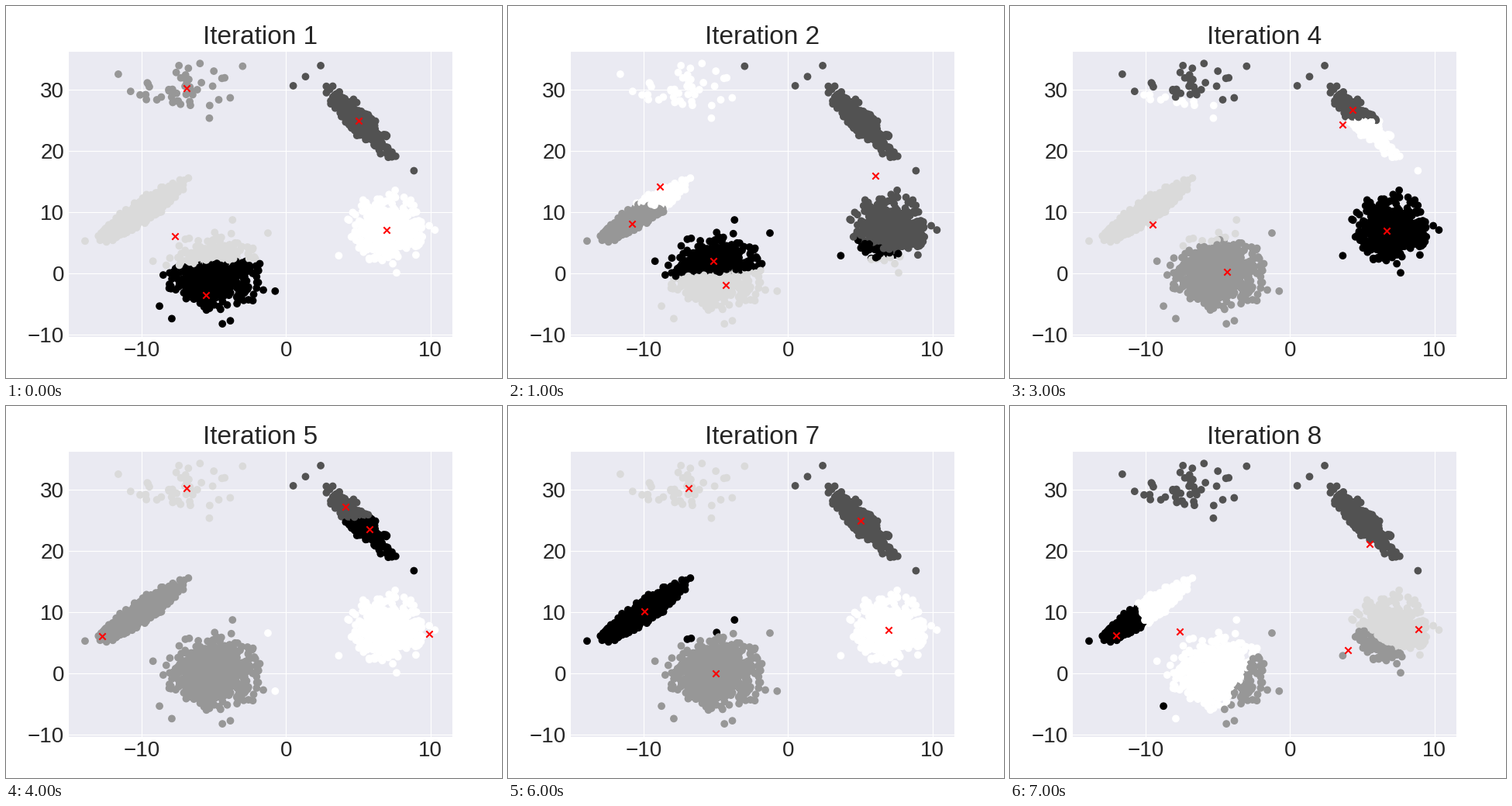
Recreate the animation shown at these times as a matplotlib script. Size 640x480 px, loop 8 s.

```python
import numpy as np
import matplotlib.pyplot as plt
from matplotlib.animation import FuncAnimation

plt.rcParams.update({
    "font.family": "Liberation Sans",
    "text.color": "0.15",
    "xtick.color": "0.15",
    "ytick.color": "0.15",
    "axes.edgecolor": "white",
    "axes.facecolor": "#EAEAF2",
    "axes.axisbelow": True,
    "axes.grid": True,
    "grid.color": "white",
    "grid.linestyle": "-",
    "xtick.major.size": 0,
    "ytick.major.size": 0,
    "xtick.labelsize": 20,
    "ytick.labelsize": 20,
})

rng = np.random.default_rng(7)

# Means of the five clusters, and of the two upper ones taken together
THIN = (-6.88, 30.35)
HIGH = (5.05, 24.95)
RIGHT = (6.96, 7.10)
LEFT = (-9.94, 10.10)
LOW = (-4.99, 0.06)
TOP = (3.95, 25.55)


def blob(n, mean, sx, sy, corr, reach, extremes):
    """Correlated normal cloud cut at `reach` deviations, plus its far points."""
    z = rng.normal(size=(2 * n, 2))
    z = z[np.hypot(*z.T) < reach][:n]
    x = z[:, 0]
    y = corr * x + np.sqrt(1 - corr ** 2) * z[:, 1]
    return np.vstack([np.column_stack([x * sx, y * sy]) + mean, extremes])


data = np.vstack([
    blob(46, THIN, 2.1, 2.4, 0, 1.9,
         [(-11.6, 32.6), (-3.0, 33.9), (-5.95, 34.35), (-5.3, 25.4)]),
    blob(400, HIGH, 1.0, 2.45, -0.9, 2.6,
         [(2.4, 34.0), (1.35, 32.2), (0.5, 30.7), (8.85, 16.8)]),
    blob(500, RIGHT, 1.13, 2.15, 0, 2.8,
         [(3.65, 2.9), (10.3, 7.1), (7.55, 13.6), (7.65, 0.1)]),
    blob(420, LEFT, 1.24, 2.15, 0.89, 2.6, [(-13.9, 5.3), (-6.75, 15.6)]),
    blob(750, LOW, 1.34, 2.45, 0, 2.8,
         [(-1.25, 6.6), (-3.7, 8.75), (-4.4, -8.25), (-3.85, -7.75),
          (-7.9, -7.4), (-9.2, 2.0), (-0.75, -2.9), (-8.75, -5.35)]),
])
rng.shuffle(data)

# Centres per iteration, ordered from the darkest to the lightest label
centers = np.array([
    [(-5.53, -3.61), HIGH, THIN, (-7.68, 6.15), RIGHT],
    [(-5.16, 1.97), (6.02, 16.04), (-10.79, 8.12), (-4.30, -1.84), (-8.86, 14.27)],
    [LOW, (6.71, 8.12), (7.36, 4.88), TOP, LEFT],
    [(6.71, 7.04), (4.35, 26.82), (-4.35, 0.32), (-9.51, 8.05), (3.65, 24.29)],
    [(5.8, 23.6), (4.1, 27.3), (-12.7, 6.1), THIN, (9.9, 6.5)],
    [(-4.56, 1.27), RIGHT, LEFT, (-5.85, -2.73), TOP],
    [LEFT, HIGH, LOW, THIN, RIGHT],
    [(-12.03, 6.25), (5.53, 21.12), (4.03, 3.87), (8.86, 7.17), (-7.63, 6.85)],
])


def nearest(mids):
    gap = data[:, None] - mids[None]
    return (gap ** 2).sum(axis=2).argmin(axis=1)


fig, ax = plt.subplots(figsize=(6.4, 4.8), dpi=100, facecolor="white")
ax.set_xlim(-15.08, 11.51)
ax.set_ylim(-10.42, 36.45)
ax.set_xticks([-10, 0, 10])
ax.set_yticks(range(-10, 31, 10))
title = ax.set_title("Iteration 1", fontsize=24)
dots = ax.scatter(*data.T, c=nearest(centers[0]), cmap="Greys_r", vmin=0, vmax=4)
marks = ax.scatter(*centers[0].T, c="red", marker="x", zorder=3)


def update(i):
    title.set_text(f"Iteration {i + 1}")
    dots.set_array(nearest(centers[i]))
    marks.set_offsets(centers[i])
    return title, dots, marks


anim = FuncAnimation(fig, update, frames=len(centers), interval=1000,
                     repeat=True, repeat_delay=0)
plt.show()
```
